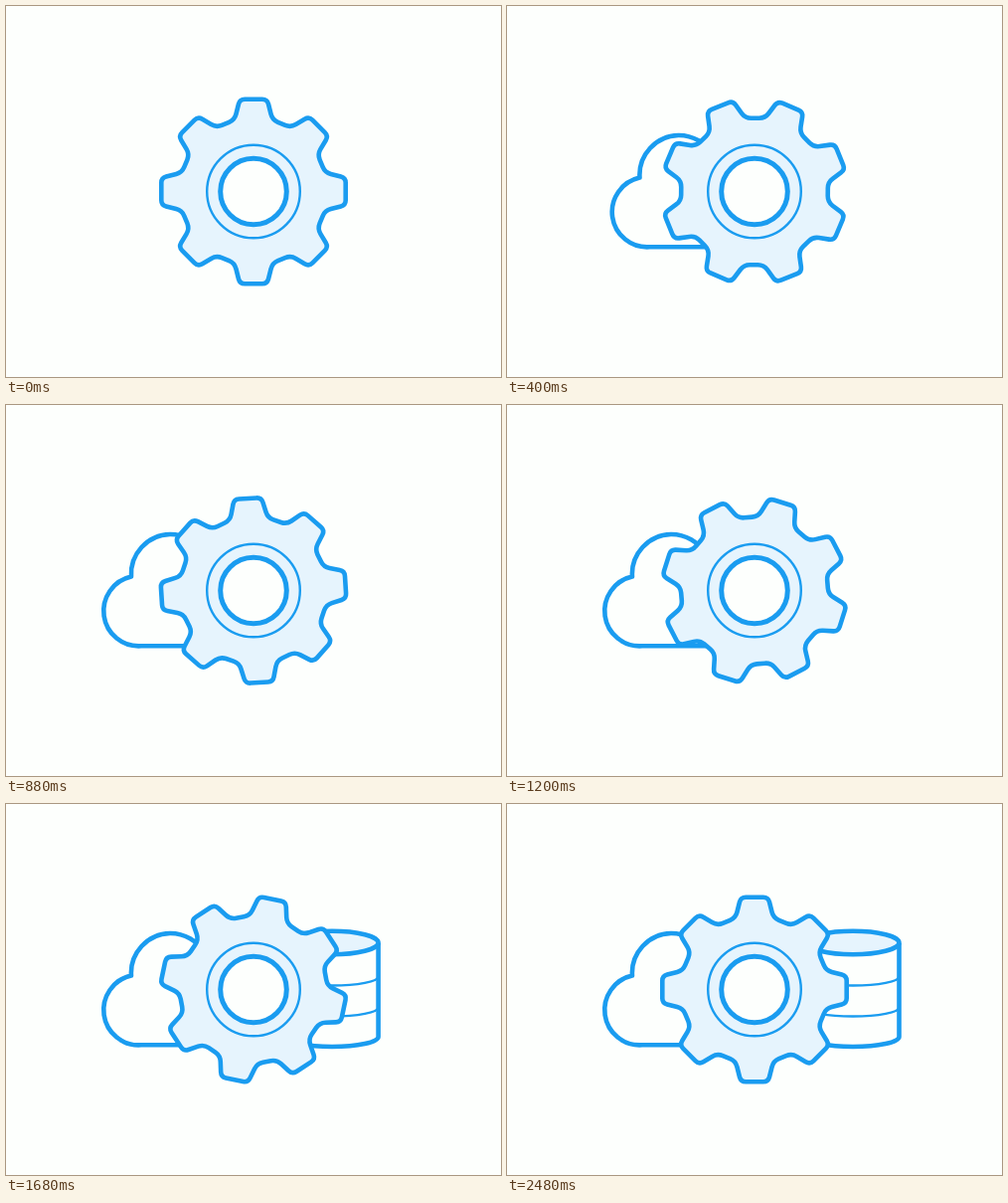
Write an HTML page that moves like this. It is 498x373 px and loops after 3360 ms.

```html
<!DOCTYPE html>
<html lang="en">
<head>
<meta charset="utf-8">
<title>Gear, cloud and storage</title>
<style>
  html, body { margin: 0; width: 100%; height: 100%; overflow: hidden; background: #fdfffd; }
  svg { display: block; width: 100vw; height: 100vh; }
  .line { fill: none; stroke: #1a9cf0; stroke-width: 4.6; stroke-linejoin: round; }
  .thin { stroke-width: 2.4; }
  .tint { fill: #e6f4fd; }
  .hole { fill: #fdfffd; stroke-width: 5; }
</style>
</head>
<body>
<svg viewBox="0 0 498 373">
  <path id="cloud" class="line" d="M136 242.3A35.3 35.3 0 0 1 126 172.6A40 40 0 0 1 165 130A40 40 0 0 1 200 150A46.2 46.2 0 0 1 200 242.3Z"/>
  <g id="disk" class="line">
    <path d="M301.5 140V234A46.5 10 0 0 0 394.5 234V140"/>
    <path class="thin" d="M301.5 173.5A46.5 9 0 0 0 394.5 173.5M301.5 204.5A46.5 9 0 0 0 394.5 204.5"/>
    <ellipse class="tint" cx="348" cy="139.5" rx="46.5" ry="11.7"/>
  </g>
  <path id="gear" class="line tint"/>
  <circle class="line thin" cx="249" cy="186.5" r="46.8"/>
  <circle class="line hole" cx="249" cy="186.5" r="33.3"/>
</svg>
<script>
  const LOOP = 3360, STEP = 80, LAST = 2480;
  const [cloud, disk, gear] = ['cloud', 'disk', 'gear'].map(id => document.getElementById(id));

  // Closed outline with rounded corners
  function rounded(corners) {
    const n = corners.length;
    const toward = (a, b, r) => {
      const k = r / Math.hypot(b.x - a.x, b.y - a.y);
      return `${(a.x + (b.x - a.x) * k).toFixed(2)} ${(a.y + (b.y - a.y) * k).toFixed(2)}`;
    };
    return corners.map((p, i) => {
      const start = toward(p, corners[(i + n - 1) % n], p.r);
      const end = toward(p, corners[(i + 1) % n], p.r);
      return `${i ? 'L' : 'M'}${start}Q${p.x} ${p.y} ${end}`;
    }).join('') + 'Z';
  }

  function gearPath() {
    const tooth = [[-19, -72, 6], [-13.8, -92.7, 5], [13.8, -92.7, 5], [19, -72, 6]];
    const corners = [];
    for (let i = 0; i < 8; i++) {
      const c = Math.cos(i * Math.PI / 4), s = Math.sin(i * Math.PI / 4);
      for (const [x, y, r] of tooth) corners.push({ x: x * c - y * s, y: x * s + y * c, r });
    }
    return rounded(corners);
  }

  const progress = (t, start, length) => Math.min(1, Math.max(0, (t - start) / length));
  const easeOut = p => 1 - (1 - p) ** 2;

  // cubic-bezier(.25, .1, .25, 1), solved by bisection
  function ease(p) {
    let lo = 0, hi = 1;
    for (let i = 0; i < 24; i++) {
      const s = (lo + hi) / 2;
      if (0.75 * s * (1 - s) + s ** 3 < p) lo = s; else hi = s;
    }
    return 0.3 * lo * (1 - lo) ** 2 + 3 * (1 - lo) * lo ** 2 + lo ** 3;
  }

  const TURN = 950;
  const forward = t => 45 * ease(progress(t, 0, 1340));
  function angle(t) {
    if (t < TURN) return forward(t);
    const from = forward(TURN);
    return from + (-45 - from) * ease(progress(t, TURN, 1280));
  }

  function slide(el, p, distance) {
    el.setAttribute('visibility', p > 0 ? 'visible' : 'hidden');
    el.setAttribute('transform', `translate(${distance * (1 - easeOut(p))} 0)`);
  }

  function draw(now) {
    const t = Math.min(LAST, Math.floor(now % LOOP / STEP) * STEP);
    slide(cloud, progress(t, 0, 585), 75);
    slide(disk, progress(t, 1317, 653), -101);
    gear.setAttribute('transform', `translate(249 186.5) rotate(${angle(t)})`);
  }

  gear.setAttribute('d', gearPath());
  const begin = performance.now();
  function tick() {
    draw(performance.now() - begin);
    requestAnimationFrame(tick);
  }
  tick();
</script>
</body>
</html>
```
